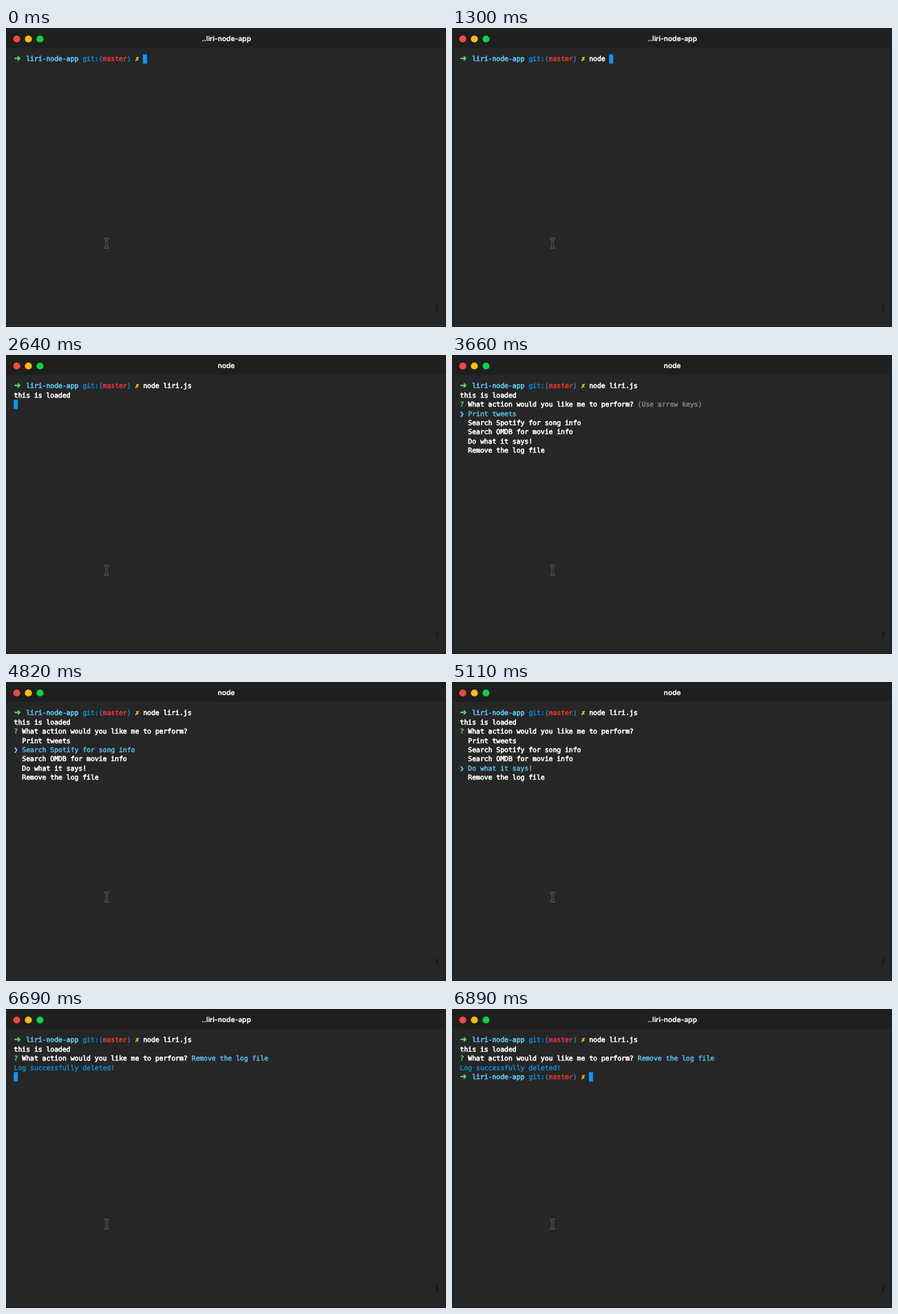
These frames come from a looping animation (639x435 px, 8000 ms). An HTML page:

```html
<!DOCTYPE html>
<html lang="en">
<head>
<meta charset="utf-8">
<title>Terminal menu</title>
<style>
  html, body { margin: 0; width: 100%; height: 100%; overflow: hidden; background: #262626; }
  svg { display: block; width: 639px; height: 435px; }
  text { white-space: pre; text-rendering: geometricPrecision; }
  #screen text {
    font: 9.74px "DejaVu Sans Mono", monospace;
    fill: currentColor; stroke: currentColor; stroke-width: .4px;
  }
  #screen .bold { stroke-width: .6px; }
  #screen .arrow { font: 12px "DejaVu Sans", sans-serif; }
  #title { font: 600 10.2px Inter, sans-serif; fill: #fff; stroke: #fff; stroke-width: .2px; text-anchor: middle; }
  .white { color: #fff; }
  .green { color: #4be366; }
  .cyan { color: #5ac8f5; }
  .blue { color: #0c8fe2; }
  .red { color: #fb3a33; }
  .yellow { color: #fdc50a; }
  .grey { color: #8a8a8a; }
</style>
</head>
<body>
<svg viewBox="0 0 639 435">
  <rect width="639" height="435" fill="#262626"/>
  <rect width="639" height="29" fill="#1f1f1f"/>
  <path d="M.5 435V.5H638.5V434.5H0" fill="none" stroke="#1e1e1e"/>
  <circle cx="15.6" cy="16" r="5.1" fill="#fc4640"/>
  <circle cx="32.5" cy="16" r="5.1" fill="#fdbb0b"/>
  <circle cx="49.4" cy="16" r="5.1" fill="#0bd344"/>
  <text id="title" x="320" y="18.7"></text>
  <g id="screen"></g>
  <rect id="caret" width="6" height="13.4" fill="#0a95ff"/>
  <g fill="none">
    <path id="beam" d="M142.7 306.5h1.8l1.5 1.5 1.5-1.5h1.8M142.7 319.5h1.8l1.5-1.5 1.5 1.5h1.8M146 308v10M144.8 313.5h2.4" stroke="#707070" stroke-width="2.6"/>
    <use href="#beam"/>
    <path d="M142.7 306.5h1.8l1.5 1.5 1.5-1.5h1.8M142.7 319.5h1.8l1.5-1.5 1.5 1.5h1.8M146 308v10M144.8 313.5h2.4" stroke="#222" stroke-width="1.4"/>
  </g>
  <rect x="624.5" y="402" width="3" height="10" rx="1" fill="#1b1b1b"/>
</svg>
<script>
const LOOP = 8000, LEFT = 11.6, TOP = 38.4, COL = 5.862, ROW = 13.4;
const SHELL = '..liri-node-app';
const COMMAND = 'node liri.js';
const QUESTION = 'What action would you like me to perform?';
const CHOICES = [
  'Print tweets',
  'Search Spotify for song info',
  'Search OMDB for movie info',
  'Do what it says!',
  'Remove the log file'
];
const screen = document.getElementById('screen');
const title = document.getElementById('title');
const caret = document.getElementById('caret');

function write(row, col, text, style) {
  const node = document.createElementNS('http://www.w3.org/2000/svg', 'text');
  node.setAttribute('x', LEFT + col * COL);
  node.setAttribute('y', TOP + row * ROW + 9.9);
  node.setAttribute('class', style);
  node.textContent = text;
  screen.append(node);
}

function prompt(row, typed = '') {
  write(row, 0, '➜', 'green arrow');
  write(row, 3, 'liri-node-app', 'cyan bold');
  write(row, 17, 'git:(', 'blue');
  write(row, 22, 'master', 'red');
  write(row, 28, ')', 'blue');
  write(row, 30, '✗', 'yellow bold');
  write(row, 32, typed, 'white bold');
}

function placeCaret(row, col) {
  caret.setAttribute('x', LEFT - .4 + col * COL);
  caret.setAttribute('y', TOP + row * ROW);
  caret.style.display = '';
}

function ask() {
  write(2, 0, '?', 'green');
  write(2, 2, QUESTION, 'white bold');
}

const typing = count => () => {
  prompt(0, COMMAND.slice(0, count));
  placeCaret(0, 32 + count);
};

function started() {
  title.textContent = 'node';
  prompt(0, COMMAND);
  placeCaret(1, 0);
}

function loaded() {
  started();
  write(1, 0, 'this is loaded', 'white bold');
  placeCaret(2, 0);
}

const menu = (selected, hint = '') => () => {
  loaded();
  ask();
  write(2, 44, hint, 'grey');
  CHOICES.forEach((choice, i) => write(3 + i, 2, choice, i === selected ? 'cyan' : 'white bold'));
  write(3 + selected, 0, '❯', 'cyan bold');
  caret.style.display = 'none';
};

function deleted() {
  loaded();
  title.textContent = SHELL;
  ask();
  write(2, 44, CHOICES[4], 'cyan');
  write(3, 0, 'Log successfully deleted!', 'blue');
  placeCaret(4, 0);
}

function finished() {
  deleted();
  prompt(4);
  placeCaret(4, 32);
}

const steps = [
  [0, typing(0)], [570, typing(1)], [720, typing(2)], [860, typing(3)],
  [1010, typing(5)], [1450, typing(7)], [1600, typing(9)], [2040, typing(10)],
  [2190, typing(12)], [2490, started], [2640, loaded],
  [3660, menu(0, '(Use arrow keys)')], [4820, menu(1)], [4960, menu(2)],
  [5110, menu(3)], [5400, menu(4)], [6690, deleted], [6890, finished]
];

let shown;
function tick() {
  const time = performance.now() % LOOP;
  const step = steps.findLast(([start]) => start <= time);
  if (step !== shown) {
    shown = step;
    screen.replaceChildren();
    title.textContent = SHELL;
    step[1]();
  }
  requestAnimationFrame(tick);
}
tick();
</script>
</body>
</html>
```
